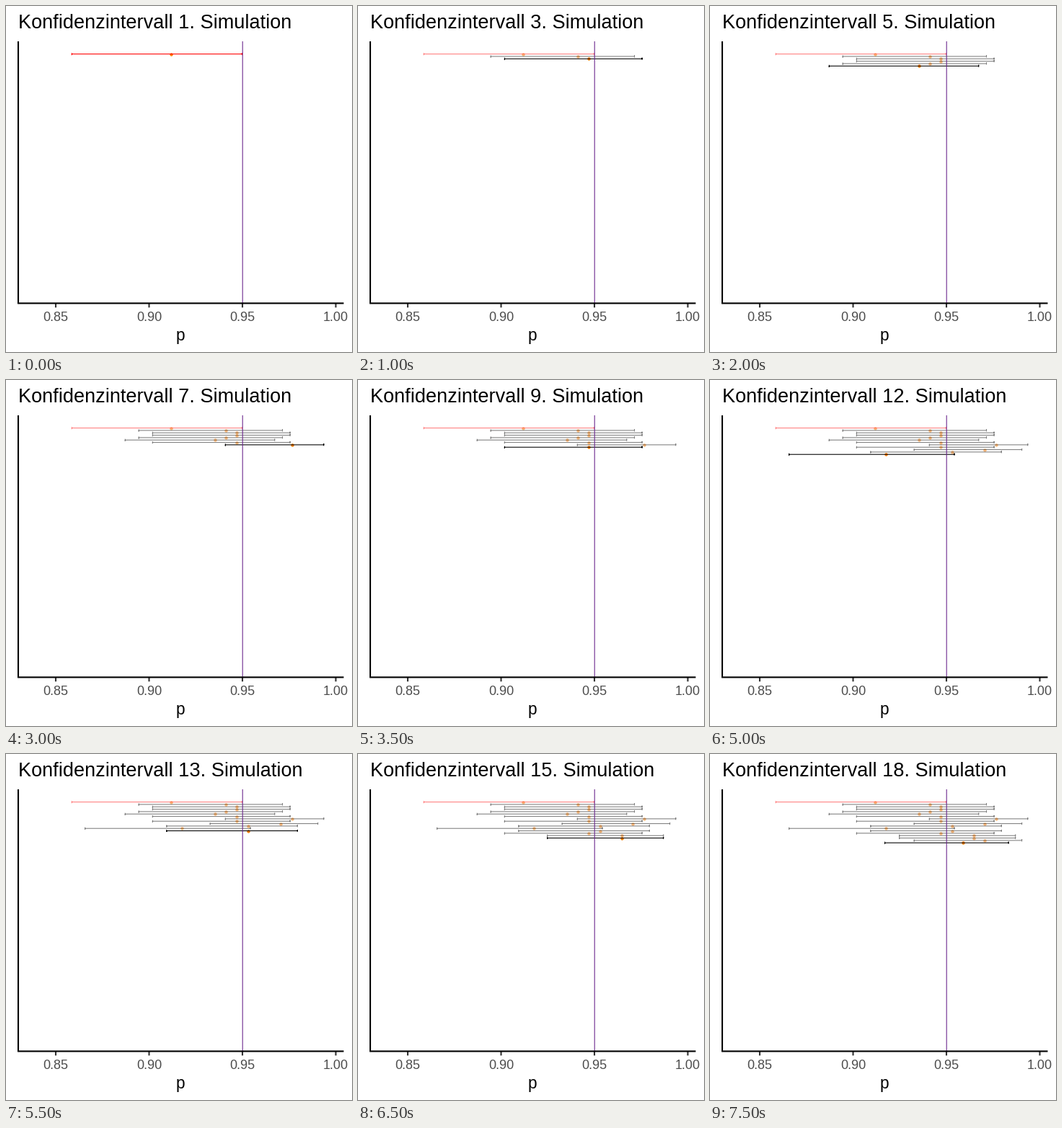
Write a matplotlib script that moves like this. It is 480x480 px and loops after 8 s.

```python
from math import comb, floor

import matplotlib.pyplot as plt
from matplotlib.animation import FuncAnimation

SIZE = 480
FRAMES, INTERVAL = 16, 500
N = 170       # draws per simulation
P_TRUE = 0.95
HITS = [155, 160, 161, 161, 160, 159, 161, 166, 161,
        165, 162, 156, 162, 161, 164, 164, 165, 163]
STEP = 1.12   # simulations per frame

plt.rcParams["font.family"] = "Liberation Sans"


def cdf(k, p):
    return sum(comb(N, i) * p**i * (1 - p) ** (N - i) for i in range(k + 1))


def solve(k, target):
    """p for which P(X <= k) equals target."""
    lo, hi = 0.0, 1.0
    for _ in range(40):
        mid = (lo + hi) / 2
        if cdf(k, mid) > target:
            lo = mid
        else:
            hi = mid
    return lo


def interval(k):
    """Exact 95 % (Clopper-Pearson) interval."""
    return solve(k - 1, 0.975), solve(k, 0.025)


def px(p):
    return 69 + (p - 0.85) * 2590


def row_y(i):
    return 66.6 + 3.33 * i


fig = plt.figure(figsize=(SIZE / 72, SIZE / 72), dpi=72, facecolor="white")
ax = fig.add_axes([0, 0, 1, 1])
ax.set(xlim=(0, SIZE), ylim=(SIZE, 0))
ax.axis("off")


def line(xs, ys, color, width, z):
    return ax.plot(xs, ys, color=color, lw=width, zorder=z, snap=False,
                   solid_capstyle="butt", solid_joinstyle="miter")[0]


def label(x, y, text, size, color="black", ha="center"):
    return ax.text(x, y, text, fontsize=size, color=color, ha=ha,
                   va="baseline")


# Axes, ticks and labels
line([17, 17], [49, 413], "black", 2.1, 6)
line([16, 468.5], [412.4, 412.4], "black", 2.1, 6)
for p in (0.85, 0.90, 0.95, 1.00):
    line([px(p)] * 2, [413, 418.3], "#333333", 2.1, 5)
    label(px(p), 437, f"{p:.2f}", 18, "#4d4d4d")
label(242.3, 464, "p", 22.6)
title = label(17, 31, "", 27.15, ha="left")
line([px(P_TRUE) + 0.2] * 2, [49, 412], "#68228b", 1.07, 4)

# One error bar with its point per simulation
bars = []
for i, k in enumerate(HITS):
    lo, hi = interval(k)
    y, a, b = row_y(i), px(lo), px(hi)
    color = "red" if hi < P_TRUE else "black"
    t, u = y - 1.5, y + 1.5
    dot = ax.plot(px(k / N), y, "o", ms=4.4, mew=0, color="#ff7f00",
                  zorder=2 + i / 100, snap=False)[0]
    bar = line([a, a, a, b, b, b], [t, u, y, y, t, u], color, 1.07,
               2.005 + i / 100)
    bars.append((dot, bar))


def update(frame):
    current = floor(1.66 + STEP * frame)
    title.set_text(f"Konfidenzintervall {floor(1.24 + STEP * frame)}. Simulation")
    for i, pair in enumerate(bars, 1):
        for artist in pair:
            artist.set_visible(i <= current)
            artist.set_alpha(1 if i == current else 0.5)
    return [title, *(artist for pair in bars for artist in pair)]


anim = FuncAnimation(fig, update, frames=FRAMES, interval=INTERVAL,
                     repeat=True, repeat_delay=0)
plt.show()
```
